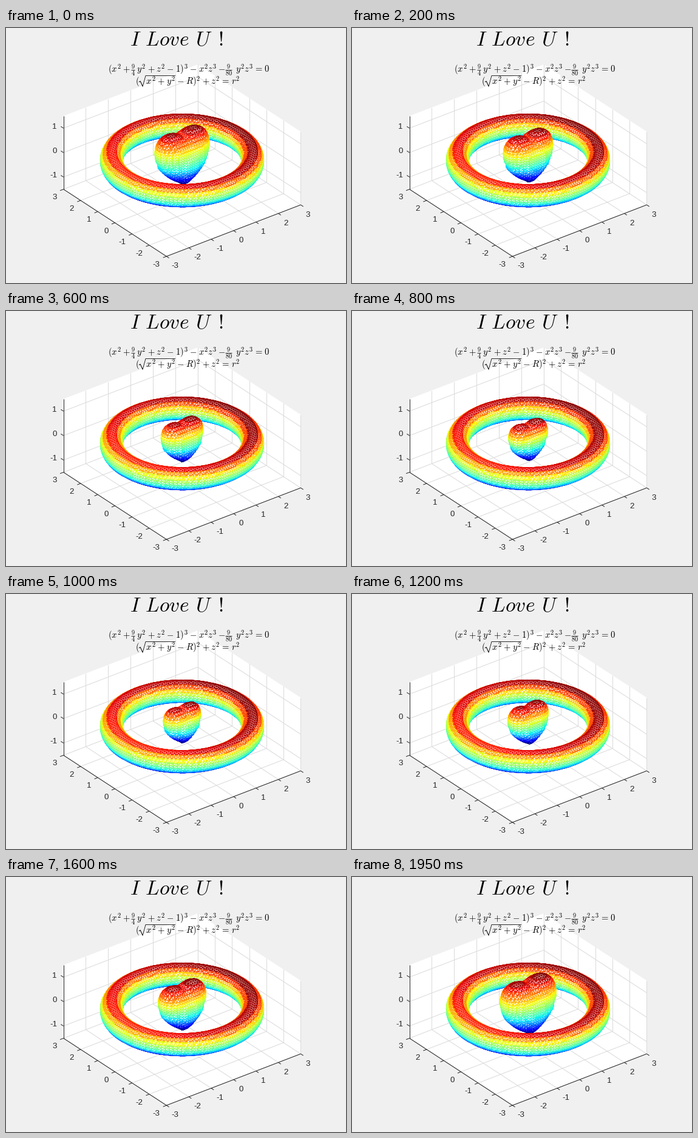
These frames come from a looping animation (560 by 420 pixels, 2000 ms). A matplotlib script:

```python
from itertools import combinations, product

import matplotlib.pyplot as plt
import numpy as np
from matplotlib.animation import FuncAnimation
from matplotlib.collections import LineCollection, PolyCollection

W, H = 560, 420
FRAMES, INTERVAL = 40, 50
PX = 0.72                       # points per pixel at 100 dpi
SCALE, CX, CY = 46.45, 290.0, 218.1
INK, GRID = "#262626", "#dadada"
EM = 14.67                      # formula size in pixels

plt.rcParams["mathtext.fontset"] = "cm"
plt.rcParams["font.family"] = "Liberation Sans"

# orthographic view, azimuth -37.5, elevation 30
az, el = np.radians([-37.5, 30])
RIGHT = np.array([np.cos(az), np.sin(az), 0])
UP = np.array([-np.sin(az) * np.sin(el), np.cos(az) * np.sin(el), np.cos(el)])
CAM = np.cross(RIGHT, UP)


def project(p):
    p = np.asarray(p, float)
    return np.stack([CX + SCALE * (p @ RIGHT), CY - SCALE * (p @ UP)], -1)


# ---- implicit surfaces -------------------------------------------------
CORNERS = np.array(list(product((0, 1), repeat=3)))
EDGES = np.array([(a, b) for a, b in combinations(range(8), 2)
                  if abs(CORNERS[a] - CORNERS[b]).sum() == 1])


def torus(x, y, z, R=2.5, r=0.4):
    return (np.sqrt(x**2 + y**2) - R)**2 + z**2 - r**2


def heart(x, y, z):
    return ((x**2 + 9 / 4 * y**2 + z**2 - 1)**3
            - x**2 * z**3 - 9 / 80 * y**2 * z**3)


def isosurface(f, n=60, lim=3):
    """Visible triangles of f = 0, far ones first, with their jet colours."""
    axis = np.linspace(-lim, lim, n)
    h = axis[1] - axis[0]
    v = f(*np.meshgrid(axis, axis, axis, indexing="ij"))
    m = n - 1
    vals = np.stack([v[i:m + i, j:m + j, k:m + k] for i, j, k in CORNERS], -1)
    neg = vals < 0
    active = neg.any(-1) & ~neg.all(-1)
    cells, vals = np.argwhere(active), vals[active]

    # colour follows the order of building: layer by layer, then x, then y
    shade = np.empty(len(cells))
    shade[np.lexsort(cells.T[[1, 0, 2]])] = np.linspace(0, 1, len(cells))

    # crossing points on the twelve edges of each cell
    a, b = EDGES.T
    va, vb = vals[:, a], vals[:, b]
    hit = (va < 0) != (vb < 0)
    t = np.where(hit, va / np.where(hit, va - vb, 1), 0)[..., None]
    pts = axis[cells][:, None] + h * (CORNERS[a] + t * (CORNERS[b] - CORNERS[a]))
    count = hit.sum(1)
    mid = (pts * hit[..., None]).sum(1) / count[:, None]

    # order them around the cell normal, then cut into a fan
    normal = vals @ (2 * CORNERS - 1)
    normal /= np.linalg.norm(normal, axis=1, keepdims=True) + 1e-12
    u = np.cross(normal, [0.31, 0.52, 0.79])
    w = np.cross(normal, u)
    d = pts - mid[:, None]
    ang = np.arctan2((d * w[:, None]).sum(-1), (d * u[:, None]).sum(-1))
    order = np.argsort(np.where(hit, ang, np.inf), axis=1)
    pts = np.take_along_axis(pts, order[..., None], axis=1)
    facing = normal @ CAM > -0.1
    fans = [(facing & (count > i + 1), [0, i, i + 1]) for i in range(1, 5)]
    tris = np.concatenate([pts[mask][:, corner] for mask, corner in fans])
    shade = np.concatenate([shade[mask] for mask, _ in fans])

    far_first = np.argsort(tris.mean(1) @ CAM)
    return tris[far_first], plt.cm.jet(shade[far_first])


# ---- stage -------------------------------------------------------------
fig = plt.figure(figsize=(W / 100, H / 100), dpi=100, facecolor="#f0f0f0")
ax = fig.add_axes([0, 0, 1, 1])
ax.set_xlim(0, W)
ax.set_ylim(H, 0)
ax.axis("off")


def lines(segments, color, z):
    ax.add_collection(LineCollection([project(s) for s in segments],
                                     colors=color, linewidths=PX, zorder=z))


def label(p, dx, dy, text, ha):
    x, y = project(p)
    ax.text(x + dx, y + dy, text, size=13.33 * PX, color=INK, ha=ha,
            va="center_baseline", zorder=3)


def draw_box():
    L, T = 3, 1.5
    walls = [[(-L, -L, -T), (L, -L, -T), (L, L, -T), (-L, L, -T)],
             [(L, -L, -T), (L, L, -T), (L, L, T), (L, -L, T)],
             [(-L, L, -T), (L, L, -T), (L, L, T), (-L, L, T)]]
    ax.add_collection(PolyCollection([project(w) for w in walls],
                                     facecolors="white", edgecolors="none", zorder=0))
    grid, ticks, out = [], [], 0.15
    for c in range(-3, 4):
        grid += [[(c, -L, -T), (c, L, -T)], [(c, L, -T), (c, L, T)],
                 [(-L, c, -T), (L, c, -T)], [(L, c, -T), (L, c, T)]]
        ticks += [[(c, -L, -T), (c, -L - out, -T)], [(-L, c, -T), (-L - out, c, -T)]]
        label((c, -L, -T), 8.5, 14.8, str(c), "left")
        label((-L, c, -T), -10.7, 12.3, str(c), "right")
    for c in (-1, 0, 1):
        grid += [[(-L, L, c), (L, L, c)], [(L, -L, c), (L, L, c)]]
        ticks.append([(-L, L, c), (-L, L + out, c)])
        label((-L, L, c), -10.7, -4, str(c), "right")
    axes = [[(-L, -L, -T), (L, -L, -T)], [(-L, -L, -T), (-L, L, -T)],
            [(-L, L, -T), (-L, L, T)]]
    lines(grid, GRID, 1)
    lines(axes + ticks, INK, 2)


def formula(x, y, text, size=EM, ha="left"):
    # TeX-like room around operators
    for op, gap in (("+", 0.053), ("-", 0.053), ("=", 0.116)):
        pad = r"\hspace{%s}" % gap
        text = text.replace(op, pad + op + pad)
    ax.text(x, y, f"${text}$", size=size * PX, color="black", ha=ha,
            va="baseline", zorder=10)


def stroke(xs, ys, width):
    ax.plot(xs, ys, color="black", lw=width * PX, zorder=10,
            solid_capstyle="butt", solid_joinstyle="miter")


def fraction(x, y, top, bottom):
    half = 0.19 * EM * len(bottom)
    formula(x, y - 0.394 * EM, top, 0.7 * EM, "center")
    formula(x, y + 0.345 * EM, bottom, 0.7 * EM, "center")
    stroke([x - half, x + half], [y - 0.25 * EM] * 2, 0.8)


def radical(x, y, width):
    stroke([x, x + 2.2, x + 6], [y - 3.4, y - 5, y + 3.6], 1.0)
    stroke([x + 6, x + 11, x + 11 + width], [y + 4, y - 14, y - 14], 0.8)


def add_mesh(tris, colors, z):
    mesh = PolyCollection(project(tris), facecolors="white", edgecolors=colors,
                          linewidths=PX, joinstyle="round", zorder=z)
    mesh.set_snap(False)
    ax.add_collection(mesh)
    return mesh


draw_box()
formula(204, 29.5, r"I\hspace{0.38}Lov\hspace{0.04}e\hspace{0.38}U\hspace{0.5}!", 33.33)
formula(167.5, 73, r"(x^2+\hspace{0.67}y^2+z^2-1)^3-x^2z^3-\hspace{1.07}y^2z^3=0")
fraction(209, 73, "9", "4")
fraction(366.7, 73, "9", "80")
formula(213, 92.5, r"(\hspace{0.95}x^2+y^2-R)^2+z^2=r^2")
radical(219, 92.5, 49)

ring, ring_colors = isosurface(torus)
front = ring.mean(1)[:, :2] @ CAM[:2] > 0
add_mesh(ring[~front], ring_colors[~front], 4)
add_mesh(ring[front], ring_colors[front], 6)


# ---- beating heart -----------------------------------------------------
def heart_at(shrink):
    return isosurface(lambda x, y, z: heart(shrink * x, shrink * y, shrink * z))


hearts = [heart_at(1 + 0.025 * step) for step in range(21)]
beat = add_mesh(np.zeros((1, 3, 3)), "white", 5)


def update(i):
    tris, colors = hearts[20 - abs(i - 19)]
    beat.set_verts(project(tris))
    beat.set_edgecolor(colors)
    return [beat]


anim = FuncAnimation(fig, update, frames=FRAMES, interval=INTERVAL,
                     repeat=True, repeat_delay=0, blit=False)
plt.show()
```
